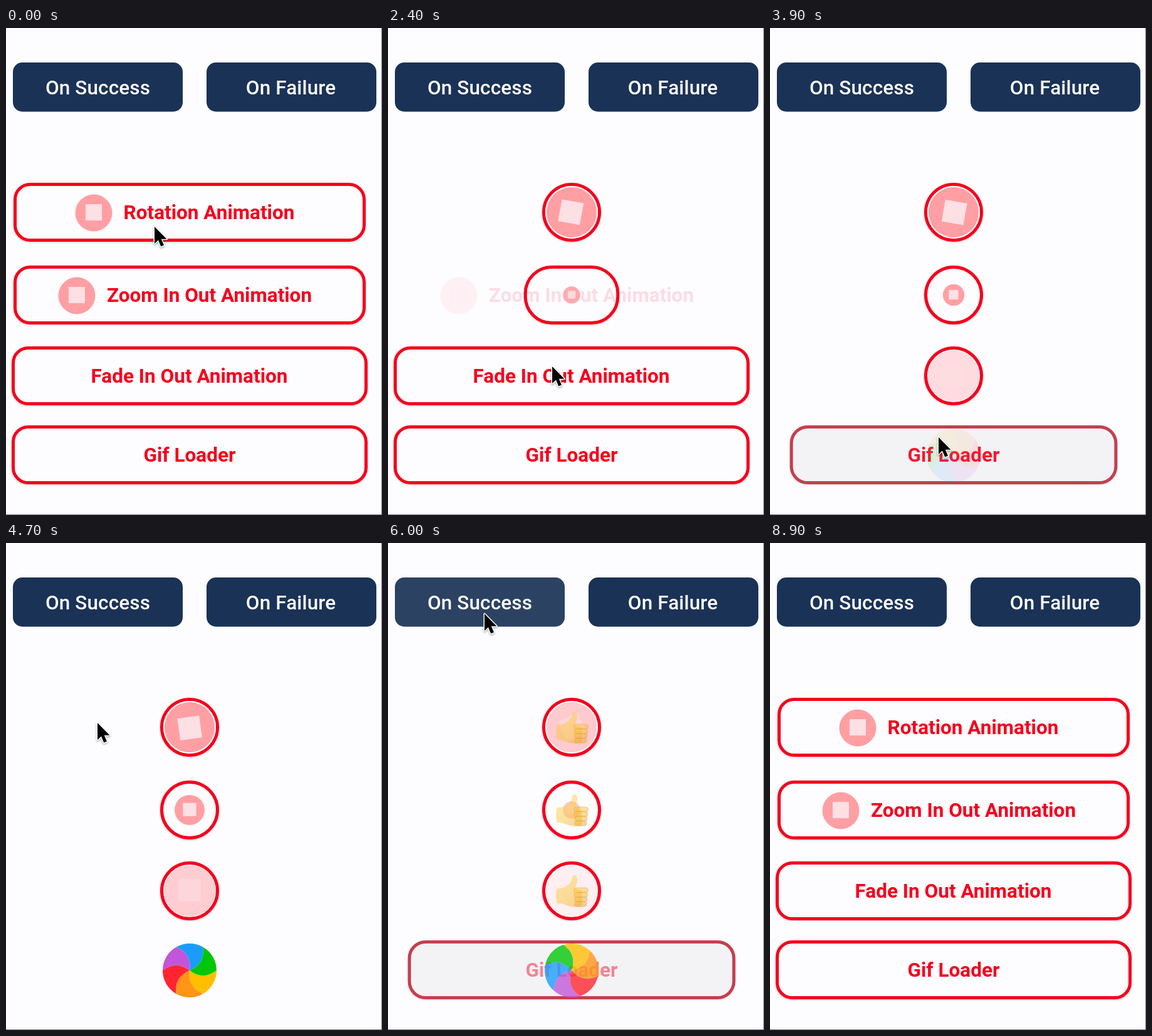
Animation, 600 px wide and 777 px high, one loop 9 s. Source, as an HTML page with a canvas:

```html
<!DOCTYPE html>
<html lang="en">
<head>
<meta charset="utf-8">
<title>Loading buttons</title>
<style>
html, body { margin: 0; width: 100%; height: 100%; overflow: hidden; background: #fdfcff; }
canvas { display: block; }
</style>
</head>
<body>
<canvas id="stage" width="600" height="777"></canvas>
<script>
const ctx = document.getElementById('stage').getContext('2d');
const LOOP = 9000, MORPH = 500, CX = 293, RING = 94;
const BG = '#fdfcff', RED = '#f5001d', NAVY = '#1a3256';
const FONT = 'Roboto, Arial, sans-serif';

const buttons = [
  { label: 'Rotation Animation', y: 247, w: 562, textX: 324, icon: 140, open: 700, close: 8000, loader: spinIcon, done: true },
  { label: 'Zoom In Out Animation', y: 379, w: 562, textX: 324.5, icon: 113, open: 2015, close: 8000, loader: zoomIcon, done: true },
  { label: 'Fade In Out Animation', y: 508, w: 568, textX: 292.5, open: 2700, close: 8000, loader: fadeIcon, done: true },
  { label: 'Gif Loader', y: 634, w: 568, textX: 293, open: 3800, close: 5600, loader: wheel, clear: true }
];
const SUCCESS = 5770;

// time, x, y
const pointer = [
  [0, 237, 317], [1000, 237, 317], [1700, 250, 430], [2080, 250, 430],
  [2400, 262, 540], [2900, 262, 542], [3500, 269, 653], [4000, 269, 653],
  [4700, 146, 287], [5150, 154, 113], [6200, 154, 113], [6700, -30, 120]
];

const clamp = v => Math.max(0, Math.min(1, v));
const mix = (a, b, k) => a + (b - a) * k;
const ease = x => (1 - Math.cos(Math.PI * x)) / 2;
const span = (t, start, length) => clamp((t - start) / length);
const mod = (a, n) => ((a % n) + n) % n;

// 0 to .5 and back once a second
function pulse(t) {
  const k = mod(t - 200, 1000) / 1000;
  return Math.min(k, 1 - k);
}

function at(x, y, alpha, draw) {
  if (alpha <= 0) return;
  ctx.save();
  ctx.globalAlpha *= alpha;
  ctx.translate(x, y);
  draw();
  ctx.restore();
}

function disc(r, color) {
  ctx.fillStyle = color;
  ctx.beginPath();
  ctx.arc(0, 0, r, 0, 2 * Math.PI);
  ctx.fill();
}

function box(x, y, w, h, r) {
  ctx.beginPath();
  ctx.roundRect(x, y, w, h, r);
}

function text(label, x, y, color, weight, spacing) {
  ctx.font = `${weight} 31.5px ${FONT}`;
  ctx.letterSpacing = spacing;
  ctx.textAlign = 'center';
  ctx.fillStyle = color;
  ctx.fillText(label, x, y);
}

function badge(r) {
  disc(r, '#ff9fa4');
  ctx.fillStyle = '#fce0e4';
  ctx.fillRect(-r * .44, -r * .47, r * .88, r * .88);
}

function spinIcon(t) {
  disc(42, '#fff');
  ctx.rotate((64 - .36 * t) * Math.PI / 180);
  badge(40);
}

function zoomIcon(t) {
  badge(7 + 34 * pulse(t));
}

function fadeIcon(t) {
  ctx.globalAlpha *= .12 + .76 * pulse(t);
  badge(41);
}

function wheel(t) {
  const R = 43, step = Math.PI / 3;
  const colors = ['#1a9cfb', '#00c707', '#ffbf00', '#ff9416', '#ff2530', '#c255d9'];
  const rim = (r, a) => [r * Math.cos(a), r * Math.sin(a)];
  ctx.rotate((t - 4700) * .194 * Math.PI / 180);
  colors.forEach((color, i) => {
    const a = -Math.PI / 2 + (i - .5) * step;
    ctx.fillStyle = color;
    ctx.beginPath();
    ctx.moveTo(0, 0);
    ctx.quadraticCurveTo(...rim(R * .62, a + .66), ...rim(R, a));
    ctx.arc(0, 0, R, a, a + step);
    ctx.quadraticCurveTo(...rim(R * .62, a + step + .66), 0, 0);
    ctx.fill();
  });
}

function thumb() {
  const skin = ctx.createLinearGradient(-20, -20, 10, 28);
  skin.addColorStop(0, '#ffd23f');
  skin.addColorStop(.6, '#fac22d');
  skin.addColorStop(1, '#eba52a');
  ctx.fillStyle = skin;
  ctx.beginPath();
  ctx.moveTo(-25, -1);
  ctx.quadraticCurveTo(-24, -5, -17, -4);
  ctx.quadraticCurveTo(-4, -8, 0, -18);
  ctx.quadraticCurveTo(0, -26, 5, -25);
  ctx.quadraticCurveTo(10, -24, 8, -13);
  ctx.lineTo(5, -4);
  ctx.lineTo(16, 0);
  ctx.lineTo(16, 24);
  ctx.quadraticCurveTo(4, 28, -9, 23);
  ctx.quadraticCurveTo(-17, 19, -24, 20);
  ctx.quadraticCurveTo(-26, 10, -25, -1);
  ctx.fill();
  ctx.strokeStyle = '#dc9527';
  ctx.lineWidth = .8;
  for (let i = 0; i < 4; i++) {
    box(3 + i * .5, -5 + i * 7.4, 23 - i * 1.3, 8, 4);
    ctx.fill();
    ctx.stroke();
  }
}

function border(b, x, p) {
  const w = mix(b.w, RING, p), k = b.clear ? clamp(x * 1.3) : 0;
  ctx.save();
  ctx.globalAlpha = 1 - k;
  ctx.shadowColor = 'rgba(60,40,50,.25)';
  ctx.shadowBlur = 3;
  ctx.shadowOffsetY = 1;
  ctx.fillStyle = BG;
  box(CX - w / 2, b.y, w, RING, mix(26, 47, p));
  ctx.fill();
  ctx.shadowColor = 'transparent';
  ctx.strokeStyle = `rgb(${mix(245, 0, k)},0,${mix(29, 0, k)})`;
  ctx.lineWidth = 5;
  box(CX - w / 2 + 2.5, b.y + 2.5, w - 5, RING - 5, mix(24, 44.5, p));
  ctx.stroke();
  ctx.restore();
}

function loadingButton(b, t) {
  const cy = b.y + RING / 2;
  const x = t < b.close ? span(t, b.open, MORPH) : 1 - span(t, b.close, MORPH);
  const shown = ease(span(t, b.open, MORPH));
  const back = span(t, b.close + 170, MORPH);
  const ok = b.done ? span(t, SUCCESS, MORPH) : 0;
  border(b, x, ease(x));
  at(0, 0, Math.max(1 - shown, back), () => {
    if (b.icon) at(b.icon, cy + 1, 1, () => badge(29.5));
    text(b.label, b.textX, cy + 11, RED, 700, '0px');
  });
  const left = b.done ? 1 - ok : 1 - back * back;
  at(CX, cy + (b.clear ? 1 : 0), shown * left, () => b.loader(t));
  if (b.done) at(CX + .5, cy, ok * (1 - back), thumb);
}

function solidButton(x, label, textX, glow) {
  box(x, 55, 271, 78.5, 15);
  ctx.fillStyle = NAVY;
  ctx.fill();
  ctx.fillStyle = `rgba(255,255,255,${glow})`;
  ctx.fill();
  text(label, textX, 105.5, '#fff', 500, '0.1px');
}

function arrow(t) {
  const i = pointer.findIndex(p => p[0] > t);
  if (i < 1) return;
  const [t0, x0, y0] = pointer[i - 1], [t1, x1, y1] = pointer[i];
  const k = ease(span(t, t0, t1 - t0));
  at(mix(x0, x1, k), mix(y0, y1, k), 1, () => {
    const shape = new Path2D('M0 0V27L6 21.5L10.2 31.5L15 29.5L10.8 19.8H19.5Z');
    ctx.shadowColor = 'rgba(0,0,0,.35)';
    ctx.shadowBlur = 3;
    ctx.shadowOffsetY = 1.5;
    ctx.strokeStyle = '#fff';
    ctx.lineWidth = 3;
    ctx.lineJoin = 'round';
    ctx.stroke(shape);
    ctx.shadowColor = 'transparent';
    ctx.fillStyle = '#000';
    ctx.fill(shape);
  });
}

function draw(t) {
  ctx.fillStyle = BG;
  ctx.fillRect(0, 0, 600, 777);
  const glow = .08 * span(t, 5500, 150) * (1 - span(t, 6000, 250));
  solidButton(11, 'On Success', 146.5, glow);
  solidButton(320, 'On Failure', 454.5, 0);
  buttons.forEach(b => loadingButton(b, t));
  arrow(t);
  ctx.fillStyle = '#77767a';
  ctx.fillRect(599, 0, 1, 777);
  ctx.fillRect(0, 776, 600, 1);
}

const start = performance.now();
function tick() {
  const t = (performance.now() - start) % LOOP;
  draw(Math.floor(t / 100) * 100);
  requestAnimationFrame(tick);
}
tick();
</script>
</body>
</html>
```
